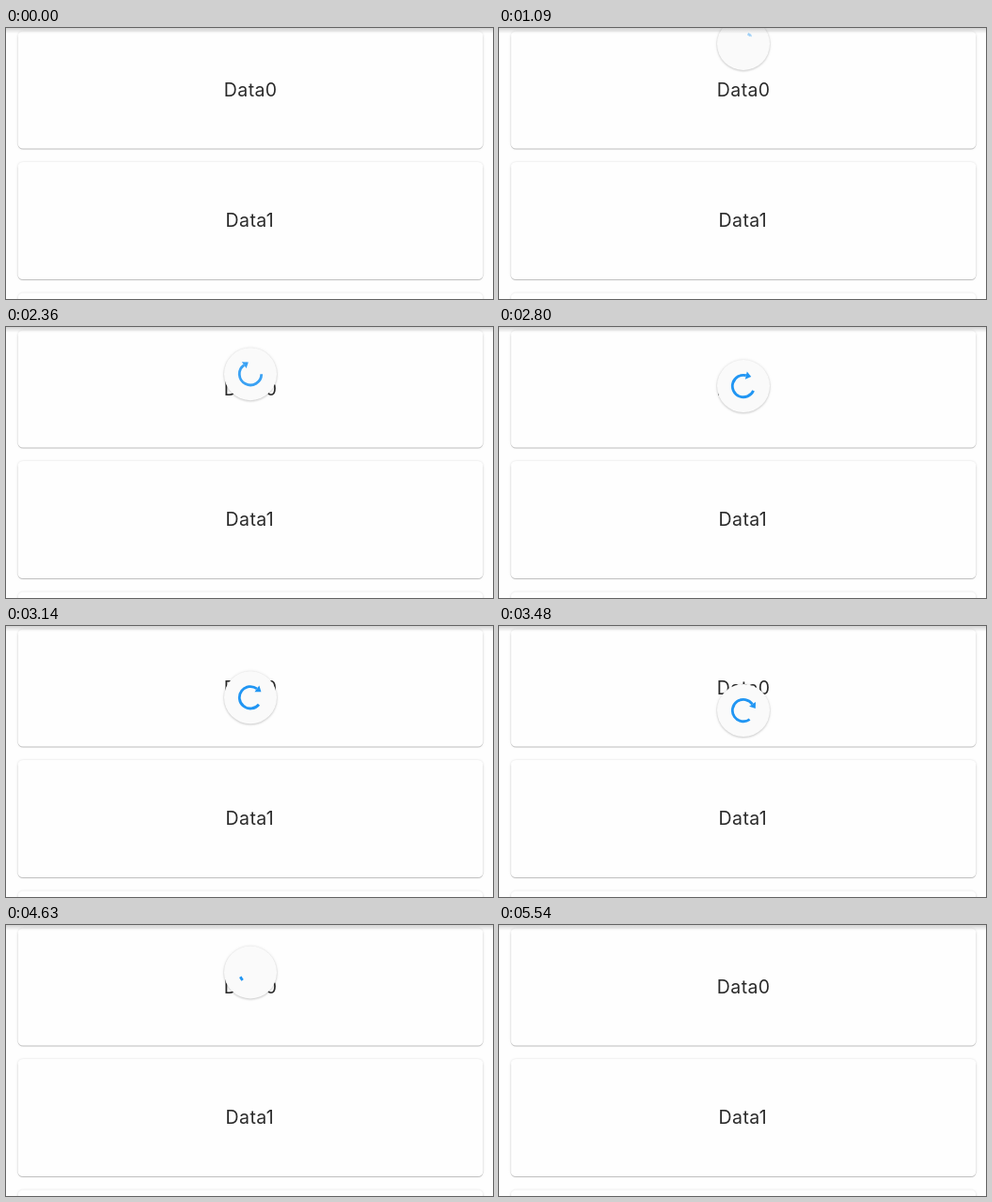
Write an HTML page that moves like this. It is 518 by 289 pixels and loops after 6.08 s.

```html
<!DOCTYPE html>
<html lang="en">
<head>
<meta charset="utf-8">
<title>Pull to refresh</title>
<style>
  html, body { margin: 0; width: 100%; height: 100%; overflow: hidden; background: #fefefe; }
  svg { display: block; width: 100%; height: 100%; }
  text { font: 400 19.5px Inter, Roboto, sans-serif; letter-spacing: .4px; fill: #2b2b2b; text-anchor: middle; }
  .card { fill: #fefefe; filter: drop-shadow(0 1px .5px rgba(0,0,0,.2)) drop-shadow(0 .3px .9px rgba(0,0,0,.13)); }
  .disc { fill: #fafafa; filter: drop-shadow(0 1.4px 1px rgba(0,0,0,.16)) drop-shadow(0 .8px 1.8px rgba(0,0,0,.11)); }
</style>
</head>
<body>
<svg viewBox="0 0 518 289">
  <defs>
    <linearGradient id="shade" x2="0" y2="1">
      <stop offset="0" stop-opacity=".17"/>
      <stop offset=".5" stop-opacity=".08"/>
      <stop offset="1" stop-opacity="0"/>
    </linearGradient>
  </defs>
  <rect width="518" height="289" fill="#fefefe"/>
  <rect class="card" x="12.5" y="3.5" width="495" height="125" rx="5.5"/>
  <rect class="card" x="12.5" y="143" width="495" height="125" rx="5.5"/>
  <rect class="card" x="12.5" y="282.5" width="495" height="125" rx="5.5"/>
  <text x="260.2" y="73">Data0</text>
  <text x="259.4" y="212">Data1</text>
  <g id="spinner">
    <circle class="disc" r="28"/>
    <g id="ring" fill="#2196f3" stroke="#2196f3">
      <path id="arc" fill="none" stroke-width="2.8"/>
      <path id="head" stroke="none"/>
    </g>
  </g>
  <rect width="518" height="6" fill="url(#shade)"/>
</svg>
<script>
const LOOP = 6080, SHOW = 680, RELEASE = 4085, SHRINK = 5240, SHRINK_TIME = 300;
const CYCLE_START = 4580, CYCLE = 1000;
const RADIUS = 11.7, STROKE = 2.8, START = -Math.PI / 2;

const [spinner, ring, arc, head] = ['spinner', 'ring', 'arc', 'head'].map(id => document.getElementById(id));
const clamp = x => Math.min(1, Math.max(0, x));

// Disc centre over time, and pull progress by disc centre
const pull = [[640, -30], [800, -8], [950, 8], [1090, 17], [1200, 17], [1800, 33], [1860, 35],
  [2420, 52], [2800, 63], [3060, 73], [3480, 90], [3650, 96], [3710, 97], [4090, 97], [4340, 50.5]];
const progress = [[-28, 0], [6, .05], [17, .15], [35, .4], [63, .75], [90, .95], [97, 1]];

function track(keys, x) {
  if (x <= keys[0][0]) return keys[0][1];
  for (let i = 1; i < keys.length; i++) {
    const [x0, y0] = keys[i - 1], [x1, y1] = keys[i];
    if (x <= x1) return y0 + (y1 - y0) * (x - x0) / (x1 - x0);
  }
  return keys[keys.length - 1][1];
}

// cubic-bezier(.4, 0, .2, 1)
function ease(x) {
  x = clamp(x);
  let lo = 0, hi = 1;
  for (let i = 0; i < 24; i++) {
    const s = (lo + hi) / 2, r = 1 - s;
    if (1.2 * r * r * s + .6 * r * s * s + s * s * s < x) lo = s; else hi = s;
  }
  return lo * lo * (3 - 2 * lo);
}

const point = (a, r) => [r * Math.cos(a), r * Math.sin(a)];
const join = pts => pts.map(p => p.map(n => n.toFixed(2)).join(' ')).join('L');

function drawRing(cycles, arrow) {
  const step = Math.floor(cycles), p = cycles - step;
  const lead = ease(p * 2), tail = ease(p * 2 - 1);
  const from = START + Math.PI * (tail * 1.5 + p * 1.7 - step * .8);
  const sweep = Math.max((lead - tail) * Math.PI * 1.5, .02), to = from + sweep;
  arc.setAttribute('d', `M${join([point(from, RADIUS)])}A${RADIUS} ${RADIUS} 0 ${+(sweep > Math.PI)} 1 ${join([point(to, RADIUS)])}`);
  arc.setAttribute('stroke-linecap', arrow ? 'butt' : 'square');

  const half = STROKE * 1.5 * arrow, reach = STROKE * 2 * arrow;
  const [x, y] = point(to, RADIUS);
  const tip = [x - Math.sin(to) * reach, y + Math.cos(to) * reach];
  head.setAttribute('d', arrow ? `M${join([point(to, RADIUS - half), point(to, RADIUS + half), tip])}Z` : '');
}

function render(t) {
  const scale = 1 - clamp((t - SHRINK) / SHRINK_TIME);
  const shown = t >= SHOW && scale > 0;
  spinner.setAttribute('visibility', shown ? 'visible' : 'hidden');
  if (!shown) return;
  const y = track(pull, t);
  spinner.setAttribute('transform', `translate(260 ${y.toFixed(2)}) scale(${scale.toFixed(3)})`);
  if (t < RELEASE) {
    const value = track(progress, y);
    drawRing(value / 2, clamp(value * 2));
    ring.setAttribute('opacity', clamp(Math.max(value / .67, .4 * clamp(value / .15))));
  } else {
    drawRing(1 + (t - CYCLE_START) / CYCLE, 0);
    ring.setAttribute('opacity', 1);
  }
}

const begin = performance.now();
function tick() {
  render((performance.now() - begin) % LOOP);
  requestAnimationFrame(tick);
}
tick();
</script>
</body>
</html>
```
